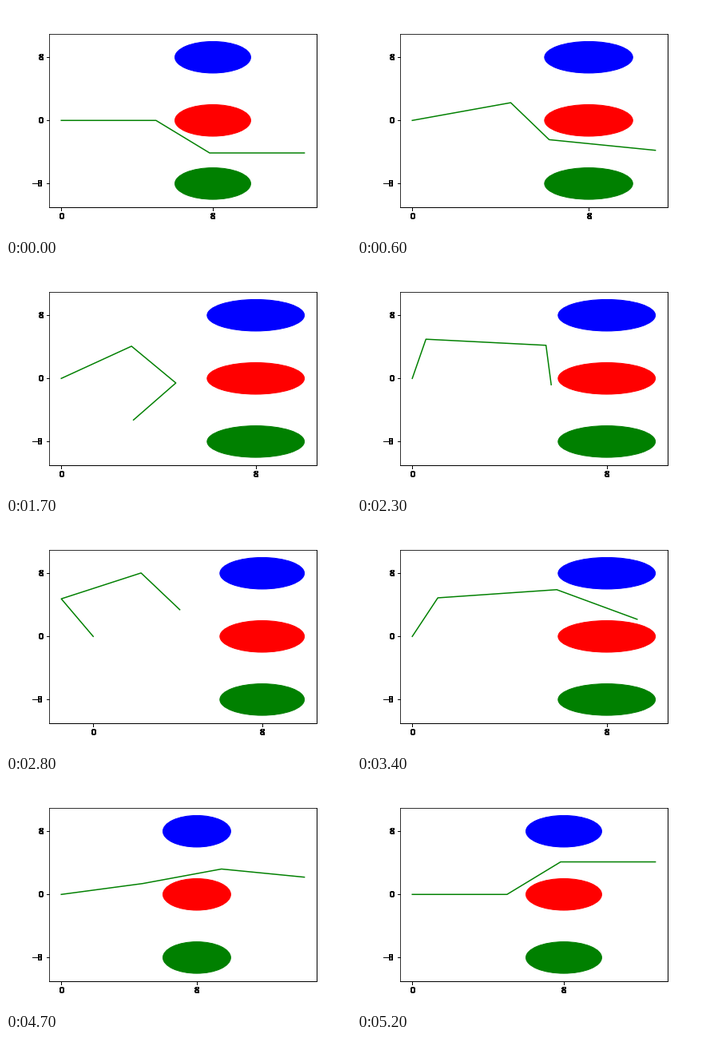
Recreate the animation shown at these times as a matplotlib script. Size 432 by 288 pixels, loop 5300 ms.

```python
import numpy as np
import matplotlib.pyplot as plt
from matplotlib.animation import FuncAnimation

FRAMES = 53
STEP_MS = 100
LINK = 5
RADIUS = 2
OBSTACLES = [(8, 8, "blue"), (8, 0, "red"), (8, -8, "green")]

# Relative joint angles in degrees; the goal mirrors the start
START = np.array([0, -55.5, 55.5])
ROUTE = {
    0: START,
    6: (26.7, -96.3, 54),
    12: (50, -115, 5),
    17: (54.7, -123.3, -41.8),
    28: (107.6, -66.7, -109.4),
    39: (53.1, -65.3, -19.8),
    47: (16, 5.6, -33.5),
    FRAMES - 1: -START,
}


def arm_points(step):
    joints = [np.interp(step, list(ROUTE), angles) for angles in zip(*ROUTE.values())]
    heading = np.radians(np.cumsum(joints))
    x = np.append(0, np.cumsum(LINK * np.cos(heading)))
    y = np.append(0, np.cumsum(LINK * np.sin(heading)))
    return x, y


def harden(image, dpi):
    """Make every touched pixel solid, for hard-edged text and lines."""
    solid = image.copy()
    solid[..., 3] = image[..., 3] > 0
    return solid, 0, 0


fig = plt.figure(figsize=(6, 4), dpi=72, facecolor="white")
ax = fig.add_axes([0.125, 0.125, 0.775, 0.755])
for cx, cy, color in OBSTACLES:
    ax.add_patch(plt.Circle((cx, cy), RADIUS, color=color))
arm, = ax.plot([], [], color="green", lw=1.5)
ax.set_ylim(-11, 11)
ax.set_xticks([0, 8])
ax.set_yticks([-8, 0, 8])

# Everything drawn outside the white panel has hard edges
for part in [*ax.get_xticklabels(), *ax.get_yticklabels(),
             *ax.get_xticklines(), *ax.get_yticklines(),
             ax.spines["right"], ax.spines["bottom"]]:
    part.set_agg_filter(harden)


def update(step):
    x, y = arm_points(step)
    arm.set_data(x, y)
    # The view always fits the arm and the obstacles, plus a 5% margin
    low, high = min(x.min(), 0), max(x.max(), 8 + RADIUS)
    margin = 0.05 * (high - low)
    ax.set_xlim(low - margin, high + margin)
    return arm,


anim = FuncAnimation(fig, update, frames=FRAMES, interval=STEP_MS,
                     repeat=True, repeat_delay=0, blit=False)
plt.show()
```
